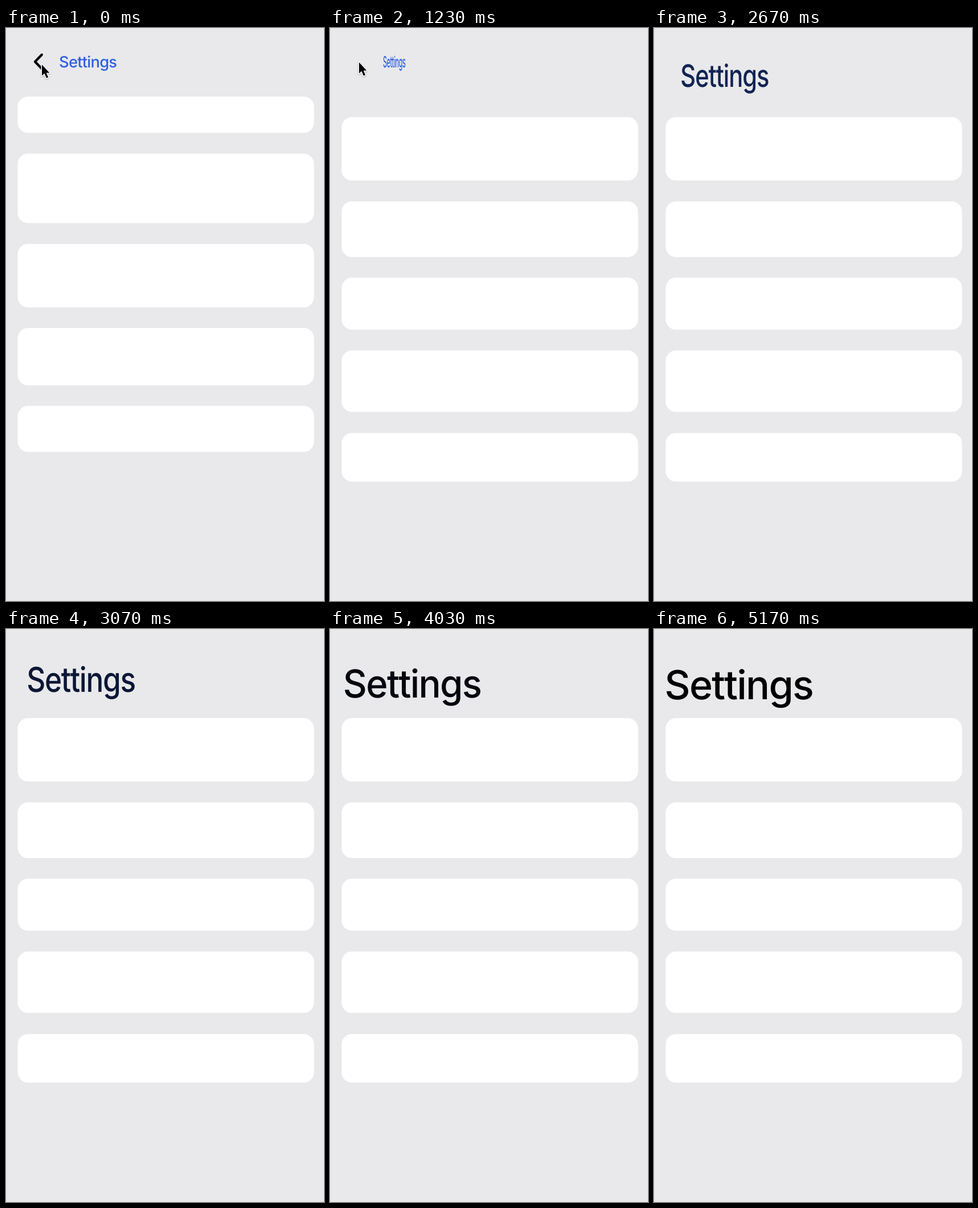
Write an HTML page that moves like this. It is 558 px wide and 1003 px high and loops after 5630 ms.

```html
<!DOCTYPE html>
<html lang="en">
<head>
<meta charset="utf-8">
<title>Settings title transition</title>
<style>
  html, body { margin: 0; width: 100%; height: 100%; overflow: hidden; background: #e9e9eb; }
  svg { display: block; width: 100%; height: 100%; }
  text {
    font: 500 70px Inter, "Liberation Sans", sans-serif;
    font-optical-sizing: none;
    letter-spacing: -.025em;
    text-rendering: geometricPrecision;
  }
  #chevron { fill: none; stroke: #000; stroke-width: 4.3; stroke-linecap: round; stroke-linejoin: round; }
  #cursor { filter: drop-shadow(0 1.5px 1.2px rgba(0, 0, 0, .3)); }
  #cursor path { stroke: #fff; stroke-width: 3; stroke-linejoin: round; paint-order: stroke; }
</style>
</head>
<body>
<svg viewBox="0 0 558 1003">
  <g id="detail" fill="#fff"></g>
  <g id="home" fill="#fff"></g>
  <path id="chevron" d="M62.8 46.8 L51 59 L62.8 71.2"/>
  <text id="title">Settings</text>
  <g id="cursor"><path d="M0 0 V19.5 L4.4 15.6 L7.8 23.6 L11.2 22.2 L7.8 14.4 H13.4 Z"/></g>
</svg>
<script>
const LOOP = 5630;
const SWITCH = 1225;
const MORPH = { start: 1220, length: 4000 };
const SMALL = 28 / 72;
const BLUE = [46, 95, 222];

const $ = id => document.getElementById(id);
const clamp = v => Math.min(1, Math.max(0, v));
const mix = (a, b, p) => a + (b - a) * p;
const show = (el, on) => el.setAttribute('visibility', on ? 'visible' : 'hidden');

// Each card is [top, bottom].
function addCards(group, cards) {
  group.innerHTML = cards.map(([top, bottom]) =>
    `<rect x="20.5" y="${top}" width="520" height="${bottom - top}" rx="18"/>`).join('');
}
addCards($('detail'), [[120, 183.5], [220, 341.5], [378, 489], [525, 625.5], [661.5, 742]]);
addCards($('home'), [[156, 267], [303.5, 401], [437, 528], [564.5, 672], [709, 794]]);

// cubic-bezier(.25, .1, .25, 1)
function ease(x) {
  if (x <= 0 || x >= 1) return clamp(x);
  const bezier = (a, b, u) => 3 * a * u * (1 - u) ** 2 + 3 * b * u * u * (1 - u) + u ** 3;
  let lo = 0, hi = 1;
  for (let i = 0; i < 24; i++) {
    const mid = (lo + hi) / 2;
    if (bezier(.25, .25, mid) < x) lo = mid; else hi = mid;
  }
  return bezier(.1, 1, lo);
}

// [time, x, y]
const cursorPath = [[0, 63, 64], [830, 63, 64], [990, 51, 60], [2190, 51, 60], [2300, 160, 54], [2480, 507, 42]];

function drawCursor(t) {
  const next = cursorPath.findIndex(step => step[0] > t);
  show($('cursor'), next > 0);
  if (next < 1) return;
  const [t0, x0, y0] = cursorPath[next - 1];
  const [t1, x1, y1] = cursorPath[next];
  const p = (t - t0) / (t1 - t0);
  $('cursor').setAttribute('transform', `translate(${mix(x0, x1, p)} ${mix(y0, y1, p)})`);
}

// The title's box grows while its type grows, so its width follows the square of the scale.
function drawTitle(t, home) {
  const p = ease((t - MORPH.start) / MORPH.length);
  const scale = mix(SMALL, 1, home ? p : 0);
  const stretch = home ? scale : 1;
  $('title').setAttribute('transform',
    `translate(${mix(93, 18.5, p)} ${mix(69, 123, p)}) scale(${scale * stretch} ${scale})`);
  $('title').setAttribute('fill', `rgb(${BLUE.map(c => Math.round(c * (1 - p)))})`);
}

function draw(t) {
  const home = t >= SWITCH;
  show($('detail'), !home);
  show($('chevron'), !home);
  show($('home'), home);
  drawTitle(t, home);
  drawCursor(t);
}

const began = performance.now();
function tick() {
  draw((performance.now() - began) % LOOP);
  requestAnimationFrame(tick);
}
tick();
</script>
</body>
</html>
```
